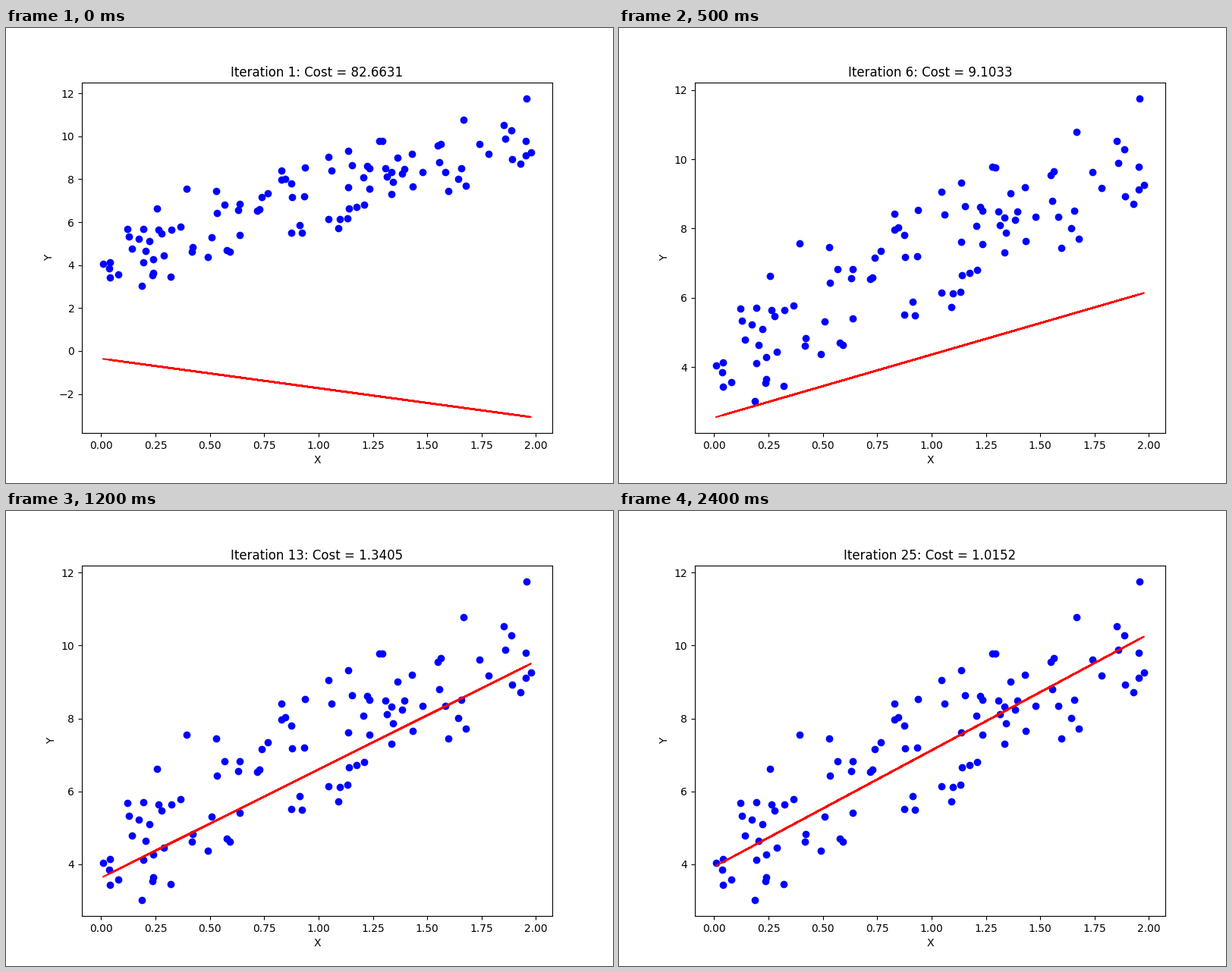
A matplotlib script for the animation above (2500 ms loop, 800 by 600 pixels).

```python
import matplotlib.pyplot as plt
import numpy as np
from matplotlib.animation import FuncAnimation

STEPS = 25
RATE = 0.1

# Noisy line y = 4 + 3x
np.random.seed(0)
x = 2 * np.random.rand(100, 1)
y = 4 + 3 * x + np.random.randn(100, 1)
A = np.c_[np.ones_like(x), x]


def descend(theta):
    """Return the fitted values and mean squared error of every step."""
    history = []
    for _ in range(STEPS):
        fit = A @ theta
        error = fit - y
        history.append((fit, np.mean(error ** 2)))
        theta = theta - RATE * A.T @ error / len(x)
    return history


history = descend(np.random.randn(2, 1))

fig, ax = plt.subplots(figsize=(8, 6), dpi=100)


def update(i):
    fit, cost = history[i]
    ax.clear()
    ax.scatter(x, y, color="blue")
    ax.plot(x, fit, color="red")
    ax.set_title(f"Iteration {i + 1}: Cost = {cost:.4f}")
    ax.set_xlabel("X")
    ax.set_ylabel("Y")


anim = FuncAnimation(fig, update, frames=STEPS, interval=100,
                     repeat=True, repeat_delay=0)
plt.show()
```
